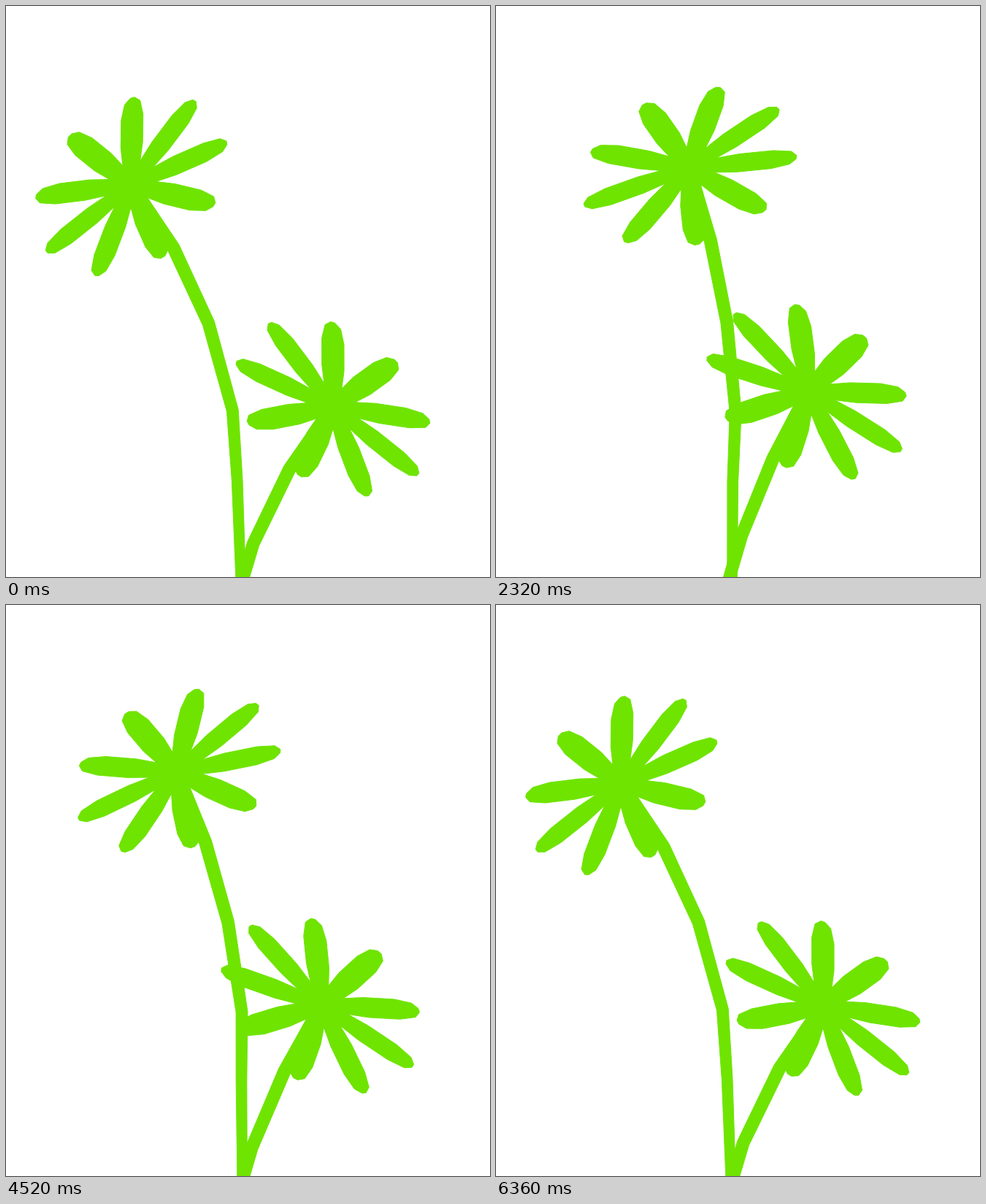
An HTML page for the animation above (6.4 s loop, 663 by 782 pixels).

```html
<!DOCTYPE html>
<html lang="en">
<head>
<meta charset="utf-8">
<title>Swaying flowers</title>
<style>
  html, body { margin: 0; width: 100%; height: 100%; overflow: hidden; background: #fff; }
  svg { display: block; width: 100%; height: 100%; fill: #6fe400; stroke: #6fe400; }
  path { vector-effect: non-scaling-stroke; }
</style>
</head>
<body>
<svg viewBox="0 0 663 782">
  <path id="tallStem"/>
  <path id="tallHead"/>
  <path id="shortStem"/>
  <path id="shortHead"/>
</svg>
<script>
const LOOP = 6400, STEP = 40, PETALS = 9, TAU = 2 * Math.PI;

// Half petal outline: [distance from the centre, half width]
const PETAL = [[0, 0.04], [0.246, 0.0895], [0.46, 0.113], [0.775, 0.113], [0.945, 0.08], [1, 0.022]];

// Stem bones from the head down: [length, lean in degrees]
const BONES = [[104, 33.9], [114, 24.9], [124, 15.4], [95, 3.8], [170, 2.1]];
const TURN_LOSS = 4.2; // each lower bone turns this much less

// A head is a matrix (two axes and the centre), given for both ends of the swing
const tall = {
  id: 'tall', side: 1, lean: 0, turn: 19.5,
  out: [1.8, -119.1, 132.6, -37.2, 171.4, 244.7],
  up: [44.6, -109.1, 143.7, 9.8, 275.8, 217.7]
};
const short = {
  id: 'short', side: -1, lean: 1, turn: 8.7,
  out: [-0.1, -115.4, -134.4, -40.6, 447.9, 548.7],
  up: [-18.5, -119.3, -139, -21.3, 423.5, 546.5]
};

const part = (plant, name) => document.getElementById(plant.id + name);
const toPath = points => 'M' + points.map(p => p.map(v => v.toFixed(4)).join()).join('L') + 'Z';
const wave = angle => (1 - Math.cos(angle)) / 2;

// A unit ring of equal petals
function flowerPath() {
  const outline = [...PETAL, ...PETAL.map(([r, w]) => [r, -w]).reverse()];
  let path = '';
  for (let k = 0; k < PETALS; k++) {
    const c = Math.cos(k * TAU / PETALS), s = Math.sin(k * TAU / PETALS);
    path += toPath(outline.map(([r, w]) => [r * c - w * s, r * s + w * c]));
  }
  return path;
}

// Follows the bones down and gives the tapering stem a mitred outline
function stemPath(plant, x, y, swing) {
  const angles = BONES.map(([, lean], i) =>
    plant.side * (lean + plant.lean - (plant.turn - TURN_LOSS * i) * swing) * TAU / 360);
  const left = [], right = [];
  for (let i = 0; i <= BONES.length; i++) {
    const above = angles[Math.max(i - 1, 0)], below = angles[i] ?? above;
    const angle = (above + below) / 2;
    const width = (8.7 - 0.085 * i * i) / Math.cos((below - above) / 2);
    const dx = width * Math.cos(angle), dy = width * Math.sin(angle);
    left.push([x - dx, y + dy]);
    right.unshift([x + dx, y - dy]);
    if (i < BONES.length) {
      x += BONES[i][0] * Math.sin(below);
      y += BONES[i][0] * Math.cos(below);
    }
  }
  return toPath([...left, ...right]);
}

function pose(plant, swing, bob) {
  const head = plant.out.map((v, i) => v + (plant.up[i] - v) * swing);
  head[5] += bob;
  part(plant, 'Head').setAttribute('transform', `matrix(${head})`);
  part(plant, 'Stem').setAttribute('d', stemPath(plant, head[4], head[5], swing));
}

function draw(now) {
  const t = Math.floor((now % LOOP) / STEP) * STEP;
  const phase = TAU * t / LOOP;
  // The tall flower runs slightly ahead in mid-swing and dips once on the way up
  pose(tall, 1.02 * wave(phase + 0.16 * wave(phase)), 9 * Math.exp(-(((t - 1400) / 610) ** 2)));
  pose(short, wave(phase), -14 * wave(phase) - 9.8 * Math.sin(phase));
}

for (const plant of [tall, short]) part(plant, 'Head').setAttribute('d', flowerPath());

let start;
function tick(now) {
  start ??= now;
  draw(now - start);
  requestAnimationFrame(tick);
}
draw(0);
requestAnimationFrame(tick);
</script>
</body>
</html>
```
